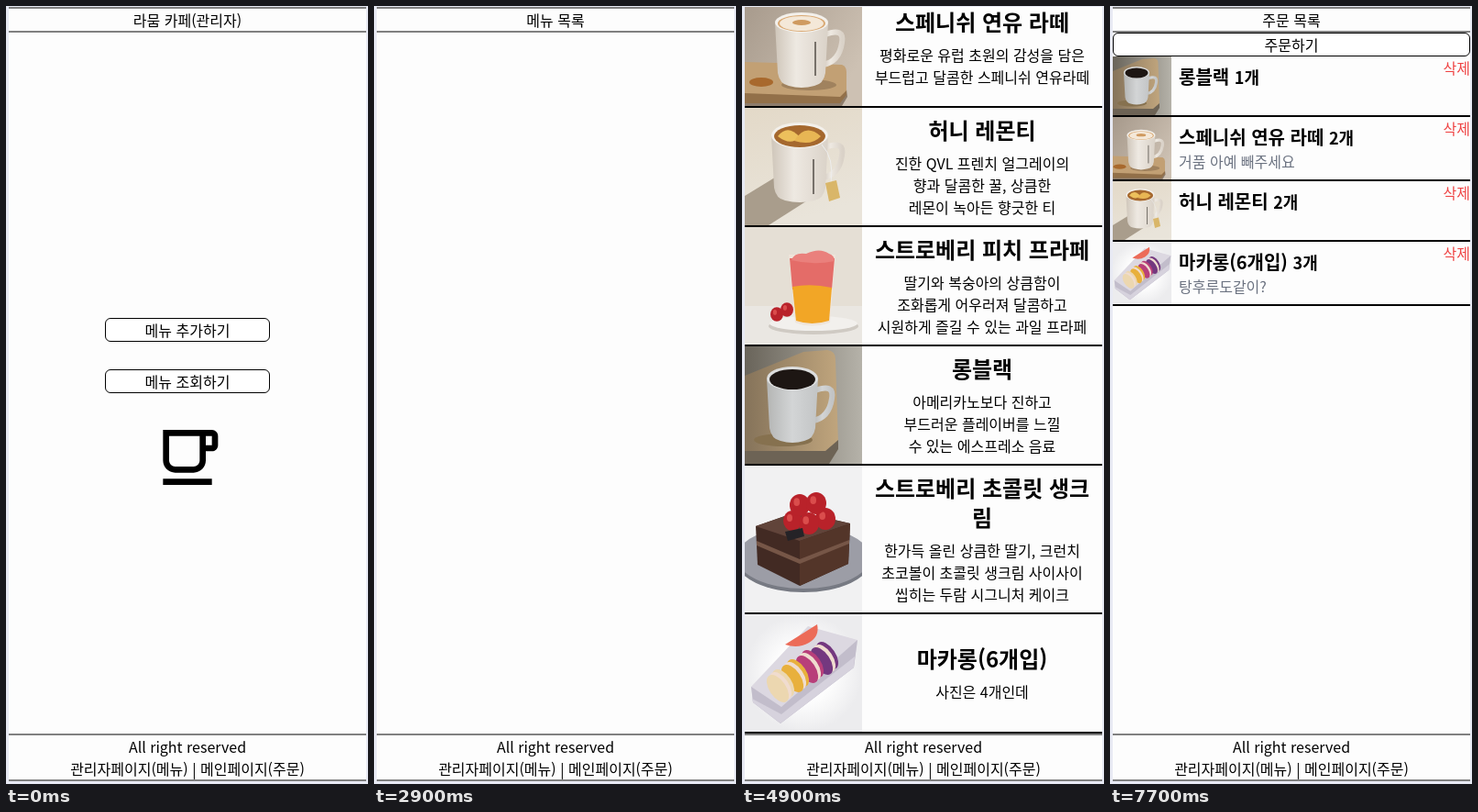
Recreate the animation shown at these times as an HTML page. Size 395 by 848 pixels, loop 8 s.

```html
<!DOCTYPE html>
<html lang="ko">
<head>
<meta charset="utf-8">
<title>카페 메뉴</title>
<style>
* { box-sizing: border-box; margin: 0; }
html, body { width: 100%; height: 100%; overflow: hidden; background: #e8eaf4; }
body { font: 16px/24px "Noto Sans CJK KR", "Noto Sans KR", "Noto Sans CJK", sans-serif; color: #000; text-align: center; }
svg { display: block; flex: none; }
#view { position: absolute; left: 3px; top: 1px; width: 390px; height: 844px; overflow: hidden; background: #fdfdfd; }
#page { min-height: 844px; display: flex; flex-direction: column; }
#bar { position: absolute; right: 0; width: 4px; height: 772px; background: #b4b4bb; }
header, footer { border: solid #808080; border-width: 2px 0; }
main { flex: 1; position: relative; }
.btn { height: 26px; border: 1px solid #000; border-radius: 6px; background: #fff; }
.home .btn { position: absolute; left: 105px; width: 180px; }
.home svg { position: absolute; left: 155px; top: 423px; }
.row { display: flex; align-items: center; border-bottom: 2px solid #000; }
.info { flex: 1; padding: 8px; }
h2 { font-size: 24px; line-height: 32px; margin-bottom: 8px; }
.order { align-items: stretch; text-align: left; }
h3 { font-size: 20px; line-height: 28px; }
h3 small { font-size: 18px; }
.note { color: #6b7280; }
.del { color: #ef4444; }
.detail svg { margin: 0 auto 8px; }
.links { position: absolute; right: 8px; top: 217px; }
</style>
</head>
<body>
<svg width="0" height="0" style="position:absolute">
  <linearGradient id="cream"><stop stop-color="#cfc6ba"/><stop offset=".4" stop-color="#eee9e2"/><stop offset="1" stop-color="#dad2c8"/></linearGradient>
  <linearGradient id="grey"><stop stop-color="#b4b5b4"/><stop offset=".5" stop-color="#d3d5d6"/><stop offset="1" stop-color="#c2c4c5"/></linearGradient>
  <linearGradient id="wall" x2="1" y2=".6"><stop stop-color="#a5988a"/><stop offset="1" stop-color="#cdc1b3"/></linearGradient>
  <linearGradient id="sun" x2=".3" y2="1"><stop stop-color="#e3d9c8"/><stop offset="1" stop-color="#e9e4da"/></linearGradient>
  <linearGradient id="slate"><stop stop-color="#69645a"/><stop offset="1" stop-color="#b5b2a9"/></linearGradient>
  <linearGradient id="wood"><stop stop-color="#85735a"/><stop offset="1" stop-color="#c0a57d"/></linearGradient>
  <radialGradient id="studio"><stop offset=".5" stop-color="#fdfdfd"/><stop offset="1" stop-color="#ececee"/></radialGradient>
</svg>
<div id="view"><div id="page"></div><div id="bar"></div></div>
<script>
const rect = (x, y, w, h, fill) => `<rect x="${x}" y="${y}" width="${w}" height="${h}" fill="${fill}"/>`;
const oval = (x, y, rx, ry, fill, turn = 0) =>
  `<ellipse cx="${x}" cy="${y}" rx="${rx}" ry="${ry}" fill="${fill}" transform="rotate(${turn} ${x} ${y})"/>`;
const shape = (d, fill) => `<path d="${d}" fill="${fill}"/>`;
const back = fill => rect(0, 0, 128, 128, fill);

function mug(x, y, r, ry, h, drink, glaze = "cream") {
  const l = x - r, e = x + r, b = y + h;
  return `<path d="M${e - 3} ${y + 13}q21 -8 18 9q-3 21 -21 24" fill="none" stroke="url(#${glaze})" stroke-width="6"/>` +
    shape(`M${l} ${y}L${l + 3} ${b - 12}Q${l + 5} ${b} ${l + 15} ${b + 2}Q${x} ${b + 6} ${e - 15} ${b + 2}Q${e - 5} ${b} ${e - 3} ${b - 12}L${e} ${y}Z`, `url(#${glaze})`) +
    oval(x, y, r, ry, glaze === "grey" ? "#dcdddd" : "#f3f0eb") + oval(x, y + 1, r - 3, ry - 2, drink);
}

const berry = (x, y, r) => oval(x, y, r, r * 1.1, "#b9222a") + oval(x - r * .3, y - r * .3, r * .3, r * .4, "#da4d4c");

const macaron = (x, y, fill) => oval(x + 4, y - 4, 9, 17, fill, -34) + oval(x + 1, y - 1, 9, 17, "#f0dccf", -34) + oval(x - 2, y + 2, 9, 17, fill, -34);

const art = {
  latte: back("url(#wall)") +
    shape("M0 86H108L112 118L106 128H0Z", "#8d7c6b") + shape("M0 80L106 83Q111 85 111 91V112L104 121H0Z", "#c2a074") +
    shape("M0 114L104 118L111 111V116L104 125H0Z", "#927049") +
    oval(18, 102, 13, 5, "#a8692d") + oval(70, 105, 30, 6, "#a0825e") +
    mug(62, 37, 29, 11, 67, "#d9a872") + oval(62, 38, 24, 8, "#f4e8d8") + oval(62, 37, 10, 3, "#cf9a60") + rect(76, 58, 2, 37, "#77716a"),
  lemon: back("url(#sun)") + shape("M0 96L36 74L70 100L26 128H0Z", "#a99d8c") +
    mug(60, 30, 31, 14, 69, "#a5682e") + shape("M36 31Q47 17 60 32Q50 42 36 31Z", "#ecc05c") + shape("M54 36Q66 16 83 31Q73 42 54 36Z", "#e8b654") +
    rect(74, 56, 2, 38, "#77716a") +
    `<path d="M84 40Q98 55 94 82" fill="none" stroke="#eee" stroke-width="1"/>` + shape("M88 82L100 79L104 98L92 102Z", "#d9b669"),
  frappe: back("#e5dfd5") + rect(0, 86, 128, 42, "#eae7e2") + oval(75, 108, 49, 9, "#cfcac3") + oval(75, 105, 48, 8, "#f2f0ed") +
    berry(35, 95, 7) + berry(46, 90, 7) +
    shape("M48 30H99L93 104Q73 111 55 104Z", "#efe5db") + shape("M49 34H98L95 68H52Z", "#e46c68") +
    shape("M52 65Q72 61 95 66L92 102Q73 108 56 102Z", "#f2a626") + shape("M51 36Q54 27 67 29Q82 22 92 29Q98 31 98 37Q74 42 51 36Z", "#ea807c"),
  black: back("url(#slate)") + shape("M0 32L64 6L90 4Q99 5 99 14L102 106L92 124H0Z", "url(#wood)") +
    shape("M0 114H88L102 102V112L92 128H0Z", "#6d6355") +
    oval(42, 102, 32, 7, "#86714f") + mug(52, 35, 28, 13, 66, "#1d1613", "grey"),
  // Drawn for its taller row, where the picture is enlarged by 1.25.
  cake: back("#f1f1f2") + `<g transform="scale(.8) translate(16)">` +
    oval(64, 104, 73, 34, "#777a83") + oval(64, 100, 73, 34, "#9c9da6") +
    shape("M12 66L58 50L115 63L113 107L60 131L14 108Z", "#422a23") + shape("M12 66L58 50L115 63L60 82Z", "#61443a") +
    shape("M60 82L115 63L113 107L60 131Z", "#533529") + shape("M13 82L60 102L114 81V85L60 107L13 87Z", "#765647") +
    berry(52, 60, 10) + berry(88, 58, 11) + berry(70, 63, 11) + berry(60, 43, 11) + berry(78, 41, 11) +
    shape("M44 72L63 68L65 77L47 82Z", "#252327") + "</g>",
  macaron: back("url(#studio)") + shape("M7 79L69 13L123 28L119 58L39 119L9 96Z", "#dcd8e1") +
    shape("M7 79L40 101L123 28L119 58L39 119L9 96Z", "#c2bdcb") +
    macaron(86, 49, "#74387f") + macaron(70, 58, "#b83f7a") + macaron(54, 68, "#e8b03c") + macaron(38, 79, "#ecd7b0") +
    shape("M8 92L40 109L120 46L119 58L39 119L9 96Z", "#d6d2dd") + shape("M44 33L79 11Q82 24 70 31Q58 38 44 33Z", "#ec6b58")
};

const menu = [
  ["latte", "스페니쉬 연유 라떼", "평화로운 유럽 초원의 감성을 담은|부드럽고 달콤한 스페니쉬 연유라떼"],
  ["lemon", "허니 레몬티", "진한 QVL 프렌치 얼그레이의|향과 달콤한 꿀, 상큼한|레몬이 녹아든 향긋한 티"],
  ["frappe", "스트로베리 피치 프라페", "딸기와 복숭아의 상큼함이|조화롭게 어우러져 달콤하고|시원하게 즐길 수 있는 과일 프라페"],
  ["black", "롱블랙", "아메리카노보다 진하고|부드러운 플레이버를 느낄|수 있는 에스프레소 음료"],
  ["cake", "스트로베리 초콜릿 생크|림", "한가득 올린 상큼한 딸기, 크런치|초코볼이 초콜릿 생크림 사이사이|씹히는 두람 시그니처 케이크"],
  ["macaron", "마카롱(6개입)", "사진은 4개인데"]
];
const orders = [[3, 1, ""], [0, 2, "거품 아예 빼주세요"], [1, 2, ""], [5, 3, "탕후루도같이?"]];

const lines = s => s.replaceAll("|", "<br>");
const pic = (name, w = 128, h = 128) =>
  `<svg width="${w}" height="${h}" viewBox="0 0 128 128" preserveAspectRatio="xMidYMid slice">${art[name]}</svg>`;
const btn = (label, style = "") => `<div class="btn" style="${style}">${label}</div>`;
const page = (title, body = "", kind = "") =>
  `<header>${title}</header><main class="${kind}">${body}</main>
   <footer>All right reserved<br>관리자페이지(메뉴) | 메인페이지(주문)</footer>`;

const cupIcon = `<svg width="80" height="80" viewBox="0 0 24 24"><path d="M16 5v8c0 1.1-.9 2-2 2H8c-1.1 0-2-.9-2-2V5h10m4-2H4v10c0 2.21 1.79 4 4 4h6c2.21 0 4-1.79 4-4v-3h2c1.11 0 2-.89 2-2V5c0-1.11-.89-2-2-2zm-2 5V5h2v3h-2zm2 11H4v2h16v-2z"/></svg>`;
const home = (title, a, b) => page(title, btn(a, "top:311px") + btn(b, "top:367px") + cupIcon, "home");

const menuRow = ([id, name, text]) =>
  `<div class="row">${pic(id, 128, name.includes("|") ? 160 : 128)}<div class="info"><h2>${lines(name)}</h2>${lines(text)}</div></div>`;
const orderRow = ([i, count, note]) =>
  `<div class="row order">${pic(menu[i][0], 64, note ? 68 : 64)}<div class="info"><h3>${menu[i][1]} <small>${count}개</small></h3>
   <div class="note">${note}</div></div><span class="del">삭제</span></div>`;
const menuPage = rows => page("메뉴 목록", btn("메뉴 추가하기") + rows);
const orderPage = rows => page("주문 목록", btn("주문하기") + rows);
const detail = ([id, name, text]) =>
  page("메뉴 목록", `${pic(id)}<h2>${name}</h2>${text.replace("|", " ")}<div class="links">수정 삭제 목록</div>`, "detail");

const blank = page("메뉴 목록"), emptyMenu = menuPage(""), fullMenu = menuPage(menu.map(menuRow).join(""));
const scenes = [
  [0, home("라뭄 카페(관리자)", "메뉴 추가하기", "메뉴 조회하기")],
  [1500, emptyMenu], [1800, fullMenu],
  [2900, blank], [3000, detail(menu[0])],
  [3800, emptyMenu], [4000, fullMenu],
  [5100, blank], [5300, detail(menu[5])],
  [6600, home("라뭄 카페", "주문하기", "주문 내역 조회하기")],
  [7500, orderPage("")], [7700, orderPage(orders.map(orderRow).join(""))]
];
const scrolls = [[0, 0], [4300, 17], [4400, 55], [4500, 74], [5100, 0]];
const fades = [[0, 0], [4300, 1], [4800, .5], [4900, 0]];

const at = (steps, t) => steps.findLast(s => s[0] <= t)[1];
const pageBox = document.getElementById("page"), bar = document.getElementById("bar");
let shown;

function draw(now) {
  const t = now % 8000, html = at(scenes, t), y = at(scrolls, t);
  if (html !== shown) pageBox.innerHTML = shown = html;
  pageBox.style.transform = y ? `translateY(${-y}px)` : "none";
  bar.style.top = y * 844 / 918 + "px";
  bar.style.opacity = at(fades, t);
  requestAnimationFrame(draw);
}
draw(performance.now());
</script>
</body>
</html>
```
